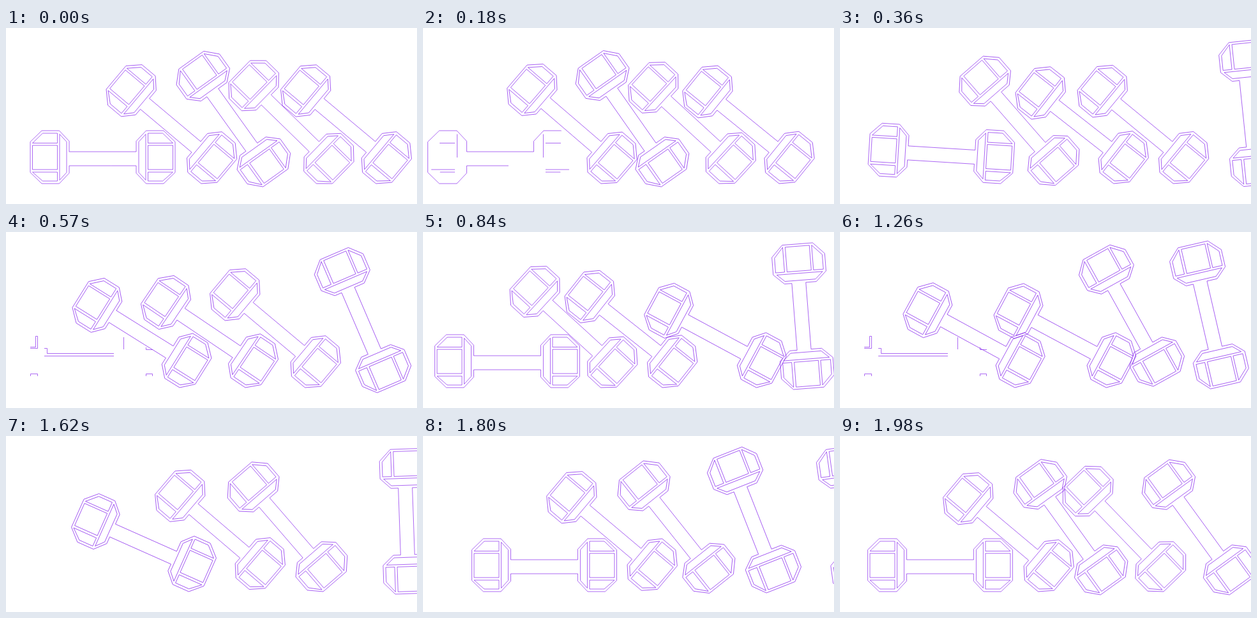
An HTML page that plays this animation: 644x276 px, repeating every 2010 ms.

```html
<!DOCTYPE html>
<html lang="en">
<head>
<meta charset="utf-8">
<title>Tumbling dumbbells</title>
<style>
  html, body { margin: 0; width: 100%; height: 100%; overflow: hidden; background: #fff; }
  svg { display: block; width: 644px; height: 276px; }
  path { fill: none; stroke: #8a2bee; stroke-width: .7; }
</style>
</head>
<body>
<svg id="stage" viewBox="0 0 644 276"></svg>
<script>
const LOOP = 2010, STEP = 30, FLOOR = 244;
const NS = 'http://www.w3.org/2000/svg';
const stage = document.getElementById('stage');

// Contours of one dumbbell lying flat, centred on 0,0
const RIM = 'M13 13.5H-52.5V25L-68 41.5H-95.5L-113.5 24V-24L-95.5 -41.5H-68L-52.5 -25V-8.5' +
  'H52.5V-25L68 -41.5H95.5L113.5 -24V24L95.5 41.5H68L52.5 25V13.5Z';
const HOLES = [
  'M-71 19.5H-110V-18.5H-71Z',
  'M-71 -22H-110L-94 -37.5H-71Z',
  'M-71 23.5H-110L-94 37.5H-71Z',
  'M-67.5 -36V36L-56.5 24V-24Z'
];
// Last bits of line before a dumbbell is gone
const REST = 'M38 182.5H49.5V163.5H46.5V180.5H38M169 190.5H64.5V182.5H60' +
  'M60 194.5H169M184.5 165V184M38.5 226V222.5H49.5V226M219.5 226V222.5H229.5V226M219.5 181V184.5H230';

// Keys: time, x, angle, optional sink below the floor
const tracks = [
  [[180, 720, 97], [570, 559, 66.8, 8], [840, 458, 28.3], [1260, 352.5, 28.1], [1620, 216, 24],
   [1800, 190, 0], [2010, 151.5, 0], [2190, 121, 0], [2270, 107, 0]],
  [[500, 725, 96], [840, 595.5, 85.5, 3], [1260, 457, 61, -2], [1620, 335.5, 40.5, -3.5],
   [1980, 264, 40], [2190, 233.5, 40.7], [2410, 145, 0], [2590, 107, 0]],
  [[860, 720, 96], [1260, 578.5, 77, 2], [1620, 441, 49.2], [1980, 361.5, 54.3, 5],
   [2190, 328, 55, 5], [2580, 213, 32], [2740, 155, 0], [2850, 132, 0], [2985, 107, 0]],
  [[1350, 725, 95], [1620, 630, 88, 4], [1980, 445.5, 46], [2010, 447, 44.3], [2190, 421.5, 42.6],
   [2580, 319, 34], [2850, 236, 42.5], [3080, 152, 0], [3285, 107, 0]],
  [[1700, 725, 95], [1980, 563, 54, 5], [2010, 533, 39.9], [2190, 510, 39.1], [2580, 422, 40],
   [2850, 326, 38.4], [3270, 210, 28.6], [3400, 165, 0], [3600, 107, 0]]
];

function add(parent, tag, attrs = {}) {
  const el = document.createElementNS(NS, tag);
  for (const name in attrs) el.setAttribute(name, attrs[name]);
  return parent.appendChild(el);
}

function makeBell(keys) {
  const body = add(stage, 'g');
  const rim = add(body, 'path', { d: RIM, pathLength: 1 });
  const holes = [];
  for (const side of [1, -1]) {
    for (const d of HOLES) {
      holes.push(add(body, 'path', { d, pathLength: 1, transform: `scale(${side} 1)` }));
    }
  }
  return { keys, body, rim, holes, rest: add(stage, 'path', { d: REST }) };
}

// Slope between key i and i + 1 for one column
const slope = (keys, i, col) =>
  ((keys[i + 1][col] || 0) - (keys[i][col] || 0)) / (keys[i + 1][0] - keys[i][0]);

// Tangent that never overshoots
function tangent(keys, i, col) {
  if (i === 0) return slope(keys, 0, col);
  if (i === keys.length - 1) return slope(keys, i - 1, col);
  const a = slope(keys, i - 1, col), b = slope(keys, i, col);
  return a * b > 0 ? 2 * a * b / (a + b) : 0;
}

function sample(keys, t, col) {
  let i = 0;
  while (i < keys.length - 2 && t >= keys[i + 1][0]) i++;
  const span = keys[i + 1][0] - keys[i][0];
  const u = (t - keys[i][0]) / span, v = 1 - u;
  const a = keys[i][col] || 0, b = keys[i + 1][col] || 0;
  return a * v * v * (1 + 2 * u) + b * u * u * (3 - 2 * u) +
    span * u * v * (v * tangent(keys, i, col) - u * tangent(keys, i + 1, col));
}

// How far the lower head reaches below the centre
function reach(deg) {
  const r = deg * Math.PI / 180, s = Math.sin(r), c = Math.abs(Math.cos(r));
  return Math.max(95.5 * s + 41.5 * c, 113.5 * s + 24 * c);
}

function trim(path, keep) {
  path.style.strokeDasharray = keep < 1 ? `${keep} 2` : 'none';
}

function show(el, on) {
  el.style.display = on ? '' : 'none';
}

function drawBell(bell, time) {
  const { keys, body, rim, holes, rest } = bell;
  const end = keys[keys.length - 1][0];
  const t = time + LOOP <= end ? time + LOOP : time;
  const alive = t >= keys[0][0] && t <= end;
  const x = alive ? sample(keys, t, 1) : 0;
  show(body, x > 114);
  show(rest, alive && x <= 114);
  if (x <= 114) return;
  const angle = sample(keys, t, 2);
  const y = FLOOR - reach(angle) + sample(keys, t, 3);
  body.setAttribute('transform', `translate(${x} ${y}) rotate(${angle})`);
  const keep = Math.min(1, (x - 100) / 30);
  trim(rim, keep);
  for (const hole of holes) trim(hole, keep ** 4);
}

const bells = tracks.map(makeBell);
const start = performance.now();

function draw() {
  const time = Math.floor((performance.now() - start) % LOOP / STEP) * STEP;
  for (const bell of bells) drawBell(bell, time);
  requestAnimationFrame(draw);
}
draw();
</script>
</body>
</html>
```
